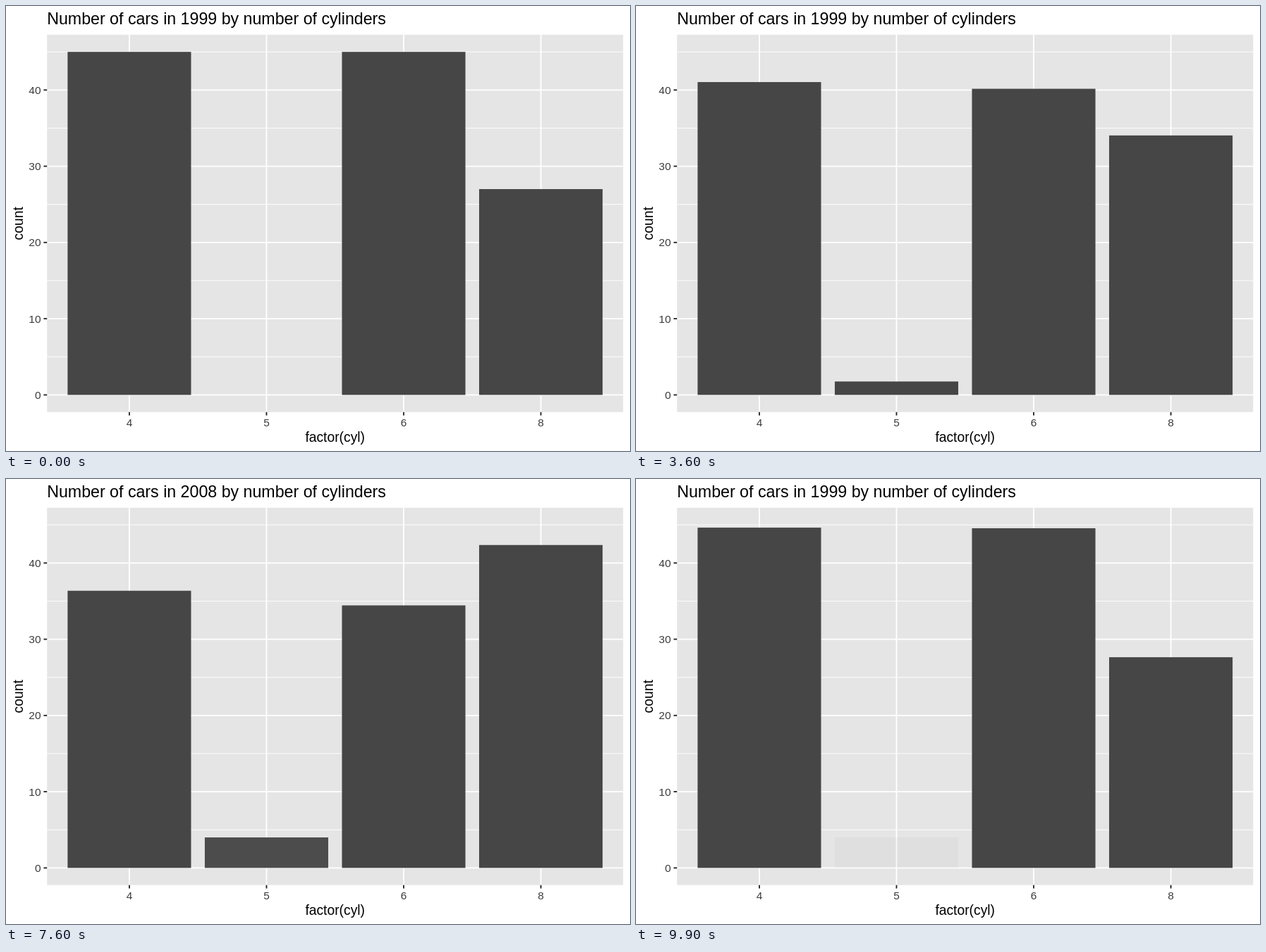
Recreate the animation shown at these times as an HTML page. Size 885 by 632 pixels, loop 10 s.

```html
<!DOCTYPE html>
<html lang="en">
<head>
<meta charset="utf-8">
<title>Cars by cylinders</title>
<style>
  html, body { margin: 0; width: 100%; height: 100%; overflow: hidden; background: #fff; }
  svg { display: block; width: 100%; height: 100%; }
  text { font-family: "Liberation Sans", Arial, sans-serif; }
</style>
</head>
<body>
<svg id="chart" viewBox="0 0 885 632"></svg>
<script>
const NS = 'http://www.w3.org/2000/svg';
const chart = document.getElementById('chart');
const panel = { left: 58.2, right: 875.3, top: 40.8, bottom: 576.7 };
const unit = (panel.right - panel.left) / 4.2;
const xAt = i => panel.left + (0.6 + i) * unit;
const yAt = v => 552.35 - v * 10.826;

function add(tag, attrs, text) {
  const el = document.createElementNS(NS, tag);
  for (const name in attrs) el.setAttribute(name, attrs[name]);
  if (text !== undefined) el.textContent = text;
  chart.appendChild(el);
  return el;
}

function line(x1, y1, x2, y2, stroke, width) {
  add('line', { x1, y1, x2, y2, stroke, 'stroke-width': width });
}

function label(text, x, y, size, anchor, fill = '#000', extra = {}) {
  return add('text', { x, y, 'font-size': size, 'text-anchor': anchor, fill, ...extra }, text);
}

const MAJOR = 1.87, MINOR = 0.94, TICK = 4.8;
const groups = [4, 5, 6, 8];

// Panel and grid
add('rect', {
  x: panel.left, y: panel.top,
  width: panel.right - panel.left, height: panel.bottom - panel.top, fill: '#e5e5e5'
});
for (let v = 5; v <= 45; v += 10) line(panel.left, yAt(v), panel.right, yAt(v), '#fff', MINOR);
for (let v = 0; v <= 40; v += 10) line(panel.left, yAt(v), panel.right, yAt(v), '#fff', MAJOR);
groups.forEach((g, i) => line(xAt(i), panel.top, xAt(i), panel.bottom, '#fff', MAJOR));

const bars = groups.map((g, i) =>
  add('rect', { x: xAt(i) - 0.45 * unit, width: 0.9 * unit, fill: '#464646' }));

// Axes
for (let v = 0; v <= 40; v += 10) {
  line(panel.left - TICK, yAt(v), panel.left, yAt(v), '#262626', MAJOR);
  label(v, 49.5, yAt(v) + 5.5, 15.45, 'end', '#3c3c3c');
}
groups.forEach((g, i) => {
  line(xAt(i), panel.bottom, xAt(i), panel.bottom + TICK, '#262626', MAJOR);
  label(g, xAt(i), 596.5, 15.45, 'middle', '#3c3c3c');
});
label('factor(cyl)', 466.7, 618.5, 19.3, 'middle');
label('count', 0, 0, 19.3, 'middle', '#000', { transform: 'translate(23.6 308.8) rotate(-90)' });
const title = label('', panel.left, 26.4, 23.2, 'start');

const LOOP = 10000, HALF = 5000, STEP = 100, STEPS = 25, HOLD = 25;
const states = [
  { year: 1999, counts: [45, 0, 45, 27] },
  { year: 2008, counts: [36, 4, 34, 43] }
];

function draw(ms) {
  const t = ms % LOOP;
  const phase = t < HALF ? 0 : 1;
  const from = states[phase], to = states[1 - phase];
  const step = Math.max(0, Math.floor((t % HALF) / STEP) - HOLD);
  const p = step / STEPS;

  bars.forEach((bar, i) => {
    // An empty group grows in from zero but fades out at full height.
    const leaving = to.counts[i] === 0;
    const count = leaving ? from.counts[i] : from.counts[i] + (to.counts[i] - from.counts[i]) * p;
    bar.setAttribute('y', yAt(count));
    bar.setAttribute('height', yAt(0) - yAt(count));
    bar.setAttribute('opacity', leaving ? 1 - p : 1);
  });

  const year = p < 0.5 ? from.year : to.year;
  const heading = `Number of cars in ${year} by number of cylinders`;
  if (title.textContent !== heading) title.textContent = heading;
}

let start;
function tick(now) {
  if (start === undefined) start = now;
  draw(now - start);
  requestAnimationFrame(tick);
}
draw(0);
requestAnimationFrame(tick);
</script>
</body>
</html>
```
